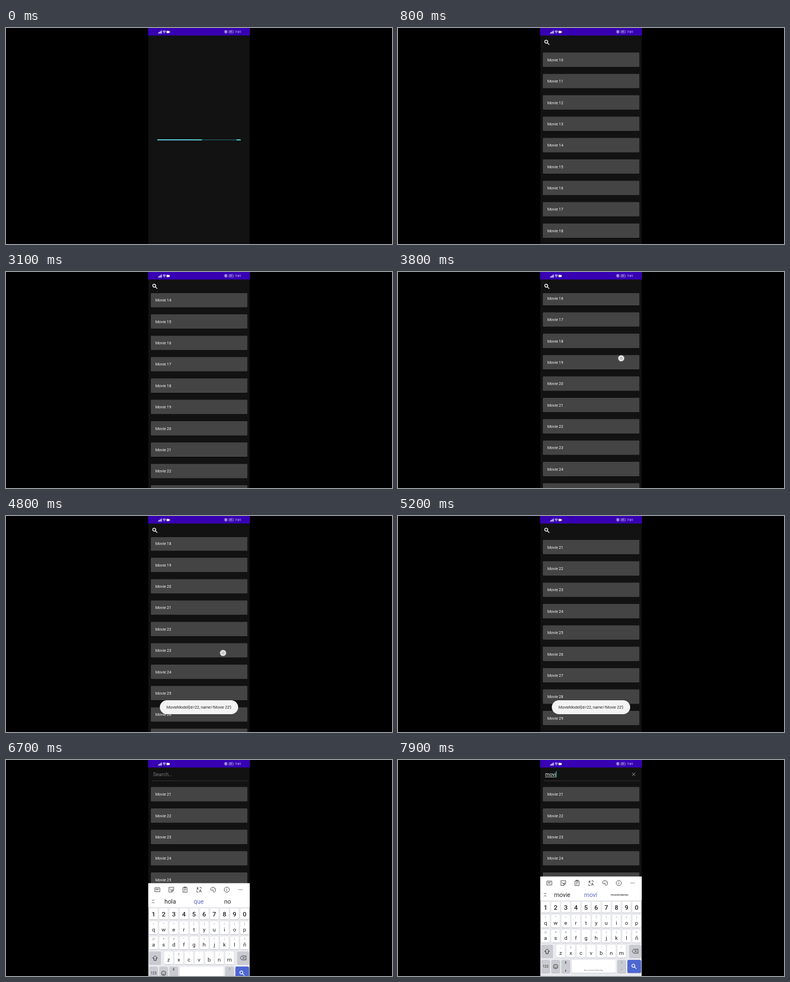
Recreate the animation shown at these times as an HTML page with a canvas. Size 690 by 388 pixels, loop 8 s.

```html
<!DOCTYPE html>
<html lang="en">
<head>
<meta charset="utf-8">
<title>Movie list</title>
<style>
html, body { margin: 0; height: 100%; overflow: hidden; background: #000; }
canvas { display: block; width: 690px; height: 388px; }
</style>
</head>
<body>
<canvas id="stage"></canvas>
<script>
const LOOP = 8000, STEP = 100;
const canvas = document.getElementById('stage');
const c = canvas.getContext('2d');
const dpr = window.devicePixelRatio || 1;
canvas.width = 690 * dpr;
canvas.height = 388 * dpr;

const SCROLL = [[1900, 0], [2000, 2.7], [2300, 98], [2450, 138], [2700, 160], [3500, 160],
  [3800, 240.3], [3950, 290], [4200, 314.5], [4800, 314.5], [5100, 410], [5400, 450],
  [5800, 450], [6000, 417.7]];
// Each touch is a list of [time, x, y]
const TOUCHES = [
  [[1300, 388, 190], [1700, 391, 252]],
  [[1900, 393, 248], [2000, 393, 245], [2300, 398, 150]],
  [[3500, 394, 237], [3800, 399, 155]],
  [[4300, 378, 206], [4400, 378, 206]],
  [[4700, 389, 247], [4800, 388, 246], [5100, 392, 150]],
  [[5700, 371, 249], [5800, 371, 248], [6000, 372, 280]],
  [[6200, 267, 26], [6300, 267, 26]]
];
const TYPED = [[7000, 'm'], [7300, 'mo'], [7600, 'mov'], [7900, 'movi']];
const SUGGEST = {
  '': ['hola', 'que', 'no'], m: ['me', 'mi', 'muy'], mo: ['moto', 'mo', 'modo'],
  mov: ['mover', 'mov', 'movie'], movi: ['movie', 'moví', 'movimiento']
};

function track(t, keys, i = 1) {
  if (t <= keys[0][0]) return keys[0][i];
  for (let k = 1; k < keys.length; k++) {
    const a = keys[k - 1], b = keys[k];
    if (t <= b[0]) return a[i] + (b[i] - a[i]) * (t - a[0]) / (b[0] - a[0]);
  }
  return keys[keys.length - 1][i];
}

function rect(x, y, w, h, fill, r = 0) {
  c.fillStyle = fill;
  c.beginPath();
  c.roundRect(x, y, w, h, r);
  c.fill();
}

function text(s, x, y, size, fill, align = 'center', weight = 400) {
  c.font = `${weight} ${size}px Roboto, sans-serif`;
  c.fillStyle = fill;
  c.textAlign = align;
  c.textBaseline = 'alphabetic';
  c.fillText(s, x, y + size * 0.355);
}

function disc(x, y, r, fill) {
  c.fillStyle = fill;
  c.beginPath();
  c.arc(x, y, r, 0, 7);
  c.fill();
}

// Stroked icon from path data, placed at x, y
function icon(d, x, y, color, width = 1) {
  c.save();
  c.translate(x, y);
  c.strokeStyle = color;
  c.lineWidth = width;
  c.stroke(new Path2D(d));
  c.restore();
}

const ring = r => `M${-r} 0a${r} ${r} 0 1 0 ${2 * r} 0a${r} ${r} 0 1 0 ${-2 * r} 0`;
const LENS = 'M-4 -1.2a2.7 2.7 0 1 0 5.4 0a2.7 2.7 0 1 0 -5.4 0M.7 .8L4.2 4.3';

function statusBar() {
  rect(254, 0, 182, 13.5, '#3700b3');
  for (let i = 0; i < 4; i++) rect(272 + i * 1.7, 8.3 - i * 1.3, 1.1, 1.6 + i * 1.3, '#fff');
  icon('M-3 -1.2Q0 -3.6 3 -1.2M-1.8 .4Q0 -1 1.8 .4M-.5 1.9L.5 1.9', 283, 7.4, '#fff', 1);
  rect(287, 5, 4.2, 4.2, '#fff', 1);
  rect(291, 5.8, 1.8, 2.6, '#fff');
  icon('M-2.8 0Q0 -3.6 2.8 0Q0 3.6 -2.8 0M-2.6 -2.3L2.6 -2.3' + ring(0.7), 393, 7.4, '#fff', 0.8);
  icon('M-4.3 -2H2.6Q4 -2 4 0Q4 2 2.6 2H-4.3Z', 403, 7, '#ddd', 0.6);
  text('85', 402.3, 7, 3.6, '#fff');
  text('7:01', 409.5, 7, 5.7, '#fff', 'left');
}

function loadingBar(t) {
  const x = 270.5, w = 149;
  const part = (a, b) => b > a && rect(x + a * w, 200, (b - a) * w, 1.8, '#62d9df');
  rect(x, 200, w, 1.8, '#1c4b4a');
  part(Math.max(0, (t - 100) / 500), Math.min(1, 0.535 + t / 600));
  part(0.95 + t / 1000, 1);
}

function list(t) {
  const scroll = track(t, SCROLL);
  c.save();
  c.beginPath();
  c.rect(254, 38, 182, 350);
  c.clip();
  for (let n = 10; n < 30; n++) {
    const y = 57.3 + (n - 10) * 38.38 - scroll;
    if (y < 15 || y > 410) continue;
    rect(259, y - 12.6, 172.5, 26, '#080808', 1.5);
    rect(259, y - 13.2, 172.5, 25.8, '#444', 1);
    text('Movie ' + n, 267, y, 7, '#f4f4f4', 'left');
  }
  if (t >= 5000) {
    const a = (t - 5800) / 1000 * 5;
    c.strokeStyle = '#32dcc8';
    c.lineWidth = 2;
    c.beginPath();
    c.arc(345, 822 - scroll, 9.2, a, a + 4.1);
    c.stroke();
  }
  const glow = track(t, [[1300, 0], [1600, 1], [1800, 1], [2000, 0.75], [2300, 0]]);
  if (glow) {
    c.fillStyle = `rgba(98, 20, 220, ${0.24 * glow})`;
    c.beginPath();
    c.moveTo(254, 38);
    c.lineTo(254, 41);
    c.quadraticCurveTo(345, 41 + 43 * glow, 436, 41);
    c.lineTo(436, 38);
    c.fill();
  }
  c.restore();
}

function searchBar(t, typed) {
  if (t < 6400) return icon(LENS, 266.3, 25.8, '#fff', 1.3);
  rect(260, 37, 172, 0.7, '#3a3a3a');
  text(typed || 'Search…', 263, 25.8, 9, typed ? '#f4f4f4' : '#777', 'left');
  const w = typed ? c.measureText(typed).width : 0;
  if (typed) rect(263, 30, w, 0.8, '#ddd');
  if (typed || t % 1000 < 500) rect(263 + w, 20, 1, 11, '#32dcc8');
  if (typed) icon('M-3 -3L3 3M3 -3L-3 3', 421.3, 25.7, '#bbb', 0.8);
}

function toast(t) {
  const a = track(t, [[4400, 0], [4600, 1], [5300, 1], [5500, 0]]);
  if (!a) return;
  c.globalAlpha = a;
  rect(275, 331, 140, 25, '#f3f3f3', 12.5);
  text("MovieModel{id=22, name='Movie 22'}", 345, 343.6, 7, '#222');
  c.globalAlpha = 1;
}

function key(x, y, w, h, fill = '#fff') {
  rect(x, y + 0.8, w, h, '#b9bac0', 2.5);
  rect(x, y, w, h, fill, 2.5);
}

function keyRow(chars, hints, x, y, h, size) {
  [...chars].forEach((ch, i) => {
    const mid = x + i * 18.1;
    key(mid - 7.8, y, 15.6, h);
    if (hints) text(hints[i], mid, y + 4.5, 5.5, '#999');
    text(ch, mid, y + (hints ? 15 : h / 2 + 0.3), size, '#222', 'center', hints ? 400 : 500);
  });
}

function toolbar() {
  const ink = '#444', y = 221;
  icon('M-4.5 -3.5H4.5V3.5H-4.5Z', 270.5, y, ink, 0.9);
  text('GIF', 270.5, y, 4, ink, 'center', 700);
  icon('M-4.3 -4.3H4.3V1L1 4.3H-4.3ZM4.3 1H1V4.3M-2 0Q0 2 2 0M-1.8 -2V-1M1.8 -2V-1', 295.5, y, ink, 0.9);
  icon('M-3.7 -4H3.7V4.7H-3.7ZM-1.5 -5H1.5V-3H-1.5ZM-2 -.5H2M-2 2H1', 320, y, ink, 0.9);
  icon('M-4.5 -3H-.5M-2.5 -4.5V-3Q-3 0 -4.5 .5M-3.5 -2L-.5 .5M.5 4.5L2.5 -.5L4.5 4.5M1.2 3H3.8M1 -4H4V-2M-4 2V4.3H-1', 345, y, ink, 0.9);
  icon('M-4.4 0Q-4 -4.5 0 -4.5Q4.5 -4 4.5 0Q4.5 4.5 1 4.5Q-.5 4 .5 2Q1 0 -1 .5Q-4 2 -4.4 0M-1 -2.5H0M2 -1.5H3', 370, y, ink, 0.9);
  icon(ring(4.6) + 'M0 -1V2.5M0 -2.8V-1.9', 394.7, y, ink, 0.9);
  for (let i = -1; i < 2; i++) disc(419.3 + i * 2.7, y, 0.75, ink);
}

function keyboard(t, typed) {
  const drop = track(t, [[6400, 179], [6500, 110], [6700, 12], [6800, 0]]);
  if (drop >= 179) return;
  c.save();
  c.translate(0, drop);
  rect(254.5, 209.5, 181, 179, '#e9eaed');
  rect(254.5, 209.5, 181, 42.5, '#fff');
  toolbar();
  icon('M-2 -3.3L0 -1.2L2 -3.3M-2 3.3L0 1.2L2 3.3', 263, 242, '#444', 0.9);
  SUGGEST[typed].forEach((word, i) =>
    text(word, [293.5, 344.5, 396][i], 242, word.length > 8 ? 6 : 10.8, i === 1 ? '#5866bd' : '#222'));

  keyRow('1234567890', '', 263.7, 254.8, 19.5, 11.5);
  keyRow('qwertyuiop', '\\^~|[]<>{}', 263.7, 278, 23, 9.8);
  keyRow('asdfghjklñ', '@#&*-+=()%', 263.7, 305, 23, 9.8);
  keyRow('zxcvbnm', "_$\"':;/", 290.8, 332, 23, 9.8);

  const grey = '#cacbd2', ink = '#333';
  key(256, 332, 21, 23, grey);
  icon('M0 -4.5L4.5 0H2V4H-2V0H-4.5Z', 266.5, 344, ink, 1);
  key(413.5, 332, 21, 23, grey);
  icon('M-5.5 0L-2.5 -3.5H5V3.5H-2.5ZM-1 -1.7L2.4 1.7M2.4 -1.7L-1 1.7', 424, 343.5, ink, 0.9);
  key(256, 359, 15.5, 23.5, grey);
  text('123', 263.7, 371, 6.3, ink);
  key(274, 359, 15.5, 23.5, grey);
  icon(ring(4) + 'M-2 1Q0 3.2 2 1M-1.4 -1.6V-.7M1.4 -1.6V-.7', 281.8, 371, ink, 0.9);
  key(292, 359, 15.5, 23.5, grey);
  rect(298.8, 361.5, 1.8, 3.6, '#666', 0.9);
  icon('M-2 0Q0 3 2 0M0 1.5V3', 299.7, 364, '#666', 0.6);
  text(',', 299.7, 374, 10, ink, 'center', 700);
  key(310.5, 359, 78.5, 23.5);
  text('Norvelund GlideTap', 349.5, 377.5, 3.9, '#888');
  key(392, 359, 15.5, 23.5, grey);
  text('?!', 399.8, 364.5, 4.5, '#888');
  text('.', 399.8, 374, 9, ink);
  key(410, 359, 24.5, 23.5, '#4d67d2');
  icon(LENS, 422, 370.8, '#fff', 1.2);
  c.restore();
}

function touch(t) {
  const path = TOUCHES.find(p => t >= p[0][0] && t <= p[p.length - 1][0]);
  if (!path) return;
  const x = track(t, path, 1), y = track(t, path, 2);
  disc(x, y, 6.5, 'rgba(255,255,255,.15)');
  disc(x, y, 5.3, '#e9e9e9');
  disc(x, y, 3, '#c8c8c8');
}

function draw(t) {
  const typed = TYPED.reduce((s, [at, word]) => t >= at ? word : s, '');
  c.setTransform(dpr, 0, 0, dpr, 0, 0);
  rect(0, 0, 690, 388, '#000');
  rect(254.5, 0, 181, 388, '#121212');
  statusBar();
  if (t < 500) return loadingBar(t);
  list(t);
  searchBar(t, typed);
  toast(t);
  keyboard(t, typed);
  touch(t);
}

const start = performance.now();
function tick() {
  const t = (performance.now() - start) % LOOP;
  draw(Math.floor(t / STEP) * STEP);
  requestAnimationFrame(tick);
}
tick();
</script>
</body>
</html>
```
